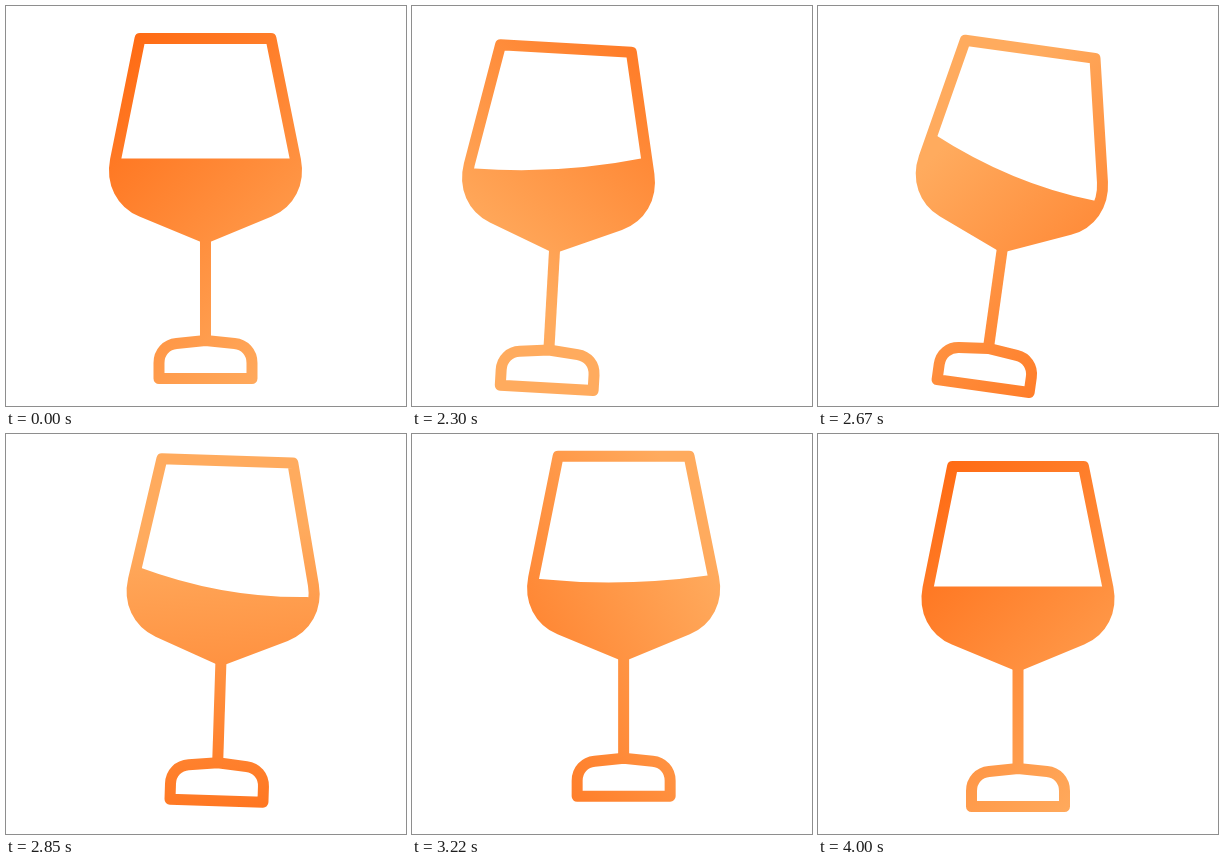
An HTML page with a canvas that plays this animation: 400 by 400 pixels, repeating every 4020 ms.

```html
<!DOCTYPE html>
<html lang="en">
<head>
<meta charset="utf-8">
<title>Swirling wine glass</title>
<style>
  html, body { margin: 0; width: 100%; height: 100%; overflow: hidden; background: #fff; }
  canvas { display: block; width: 400px; height: 400px; }
</style>
</head>
<body>
<canvas id="stage" width="400" height="400"></canvas>
<script>
const ctx = document.getElementById('stage').getContext('2d');
const LOOP = 4020, REST = 2000, SWIRL = 2000;

const bowl = new Path2D('M134.5 32.5H265.5L290 154C294.5 177 284 197 264 205.5L200 232L136 205.5C116 197 105.5 177 110 154Z');
const stem = new Path2D('M200 232V334');
const base = new Path2D('M153.5 372.5V357C153.5 346 161 338.5 171 337.5L200 334.5L229 337.5C239 338.5 246.5 346 246.5 357V372.5Z');

const radians = degrees => degrees * Math.PI / 180;

// Pose of the glass and its wine, t ms into the swirl: each value swings out and back in smooth humps.
function poseAt(t) {
  const hump = (peak, width) => Math.exp(-(((t - peak) / width) ** 4));
  const turned = 1 - (1 - t / SWIRL) ** 1.7;
  return {
    x: -56 * hump(380, 258) + 16 * hump(870, 130) + 12 * hump(1280, 140),
    y: 11 * hump(480, 300) - 11 * hump(1080, 275),
    turn: 8.2 * hump(560, 264) - 2.5 * hump(1050, 140) + 2 * hump(1400, 150),
    tilt: -10 * hump(280, 190) + 22 * hump(690, 190) - 11 * hump(1050, 160) + 1.5 * hump(1330, 160),
    stir: Math.sin(Math.PI * turned),
    light: 360 * turned - 135
  };
}

function drawWine({ x, tilt, stir }) {
  const level = 152.5 + x * 0.09, left = 116, right = 284;
  ctx.save();
  ctx.clip(bowl);
  ctx.beginPath();
  ctx.moveTo(left - 20, level - tilt * 1.2);
  ctx.lineTo(left, level - tilt);
  ctx.quadraticCurveTo(200, level + 17 * stir, right, level + tilt);
  ctx.lineTo(right + 20, level + tilt * 1.2);
  ctx.lineTo(right + 20, 250);
  ctx.lineTo(left - 20, 250);
  ctx.fill();
  ctx.restore();
}

// Tint everything drawn so far; the dark end circles the stage, further out while stirring.
function tint({ light, stir }) {
  const cos = Math.cos(radians(light)), sin = Math.sin(radians(light));
  const near = 170 + 75 * stir, far = near - 340;
  const g = ctx.createLinearGradient(200 + near * cos, 200 + near * sin, 200 + far * cos, 200 + far * sin);
  g.addColorStop(0, '#ff6b14');
  g.addColorStop(1, '#ffab5e');
  ctx.globalCompositeOperation = 'source-in';
  ctx.fillStyle = g;
  ctx.fillRect(0, 0, 400, 400);
  ctx.globalCompositeOperation = 'source-over';
}

function draw(now) {
  const t = now % LOOP - REST;
  const pose = poseAt(Math.min(Math.max(t, 0), SWIRL));
  ctx.clearRect(0, 0, 400, 400);
  ctx.save();
  ctx.translate(200 + pose.x, 200 + pose.y);
  ctx.rotate(radians(pose.turn));
  ctx.translate(-200, -200);
  ctx.lineWidth = 11;
  ctx.lineJoin = 'round';
  drawWine(pose);
  [bowl, stem, base].forEach(part => ctx.stroke(part));
  ctx.restore();
  tint(pose);
}

const start = performance.now();
function loop() {
  draw(performance.now() - start);
  requestAnimationFrame(loop);
}
loop();
</script>
</body>
</html>
```
